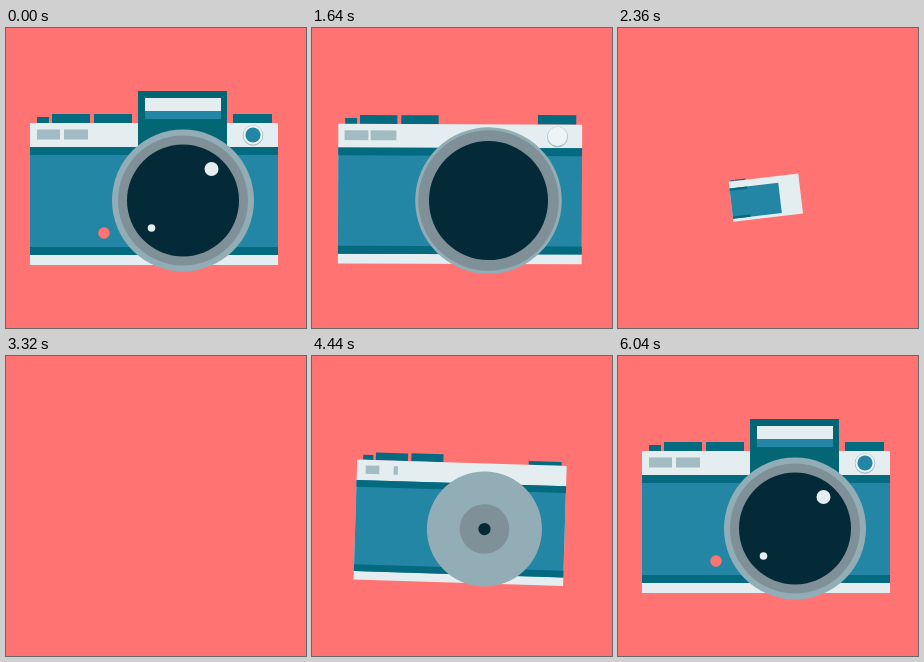
An HTML page with a canvas that plays this animation: 300 by 300 pixels, repeating every 6280 ms.

```html
<!DOCTYPE html>
<html>
<head>
<meta charset="utf-8">
<style>
html, body { margin: 0; height: 100%; overflow: hidden; background: #ff7472; }
canvas { display: block; width: 300px; height: 300px; }
</style>
</head>
<body>
<canvas id="stage" width="300" height="300"></canvas>
<script>
const ctx = document.getElementById('stage').getContext('2d');
const LOOP = 6280, TURN = 3160;
const CORAL = '#ff7472', WHITE = '#e4eef0', BLUE = '#2286a4', DARK = '#036a80',
      SILVER = '#92adb5', GRAY = '#7f9099', GLASS = '#032a36', PALE = '#a3bbc3';

let now = 0; // time on the folding half, played forwards and then backwards

const progress = (start, length) => Math.min(1, Math.max(0, (now - start) / length));
const backIn = u => u * u * (2.70158 * u - 1.70158);
const shrink = (start, length) => Math.max(0, 1 - backIn(progress(start, length)));

function rect(color, x, y, w, h) {
  ctx.fillStyle = color;
  ctx.fillRect(x, y, w, h);
}

function disc(color, x, y, r) {
  if (r <= 0) return;
  ctx.fillStyle = color;
  ctx.beginPath();
  ctx.arc(x, y, r, 0, Math.PI * 2);
  ctx.fill();
}

function wideRect(color, x, y, w, h, scale) {
  rect(color, x + w * (1 - scale) / 2, y, w * scale, h);
}

function knob(x, w, h, start) {
  const tall = h * Math.min(1.1, shrink(start, 400));
  rect(DARK, x, 95 - tall, w, tall);
}

function drawBody() {
  knob(31, 12, 6, 2050);
  knob(46, 38, 9, 2010);
  knob(88, 38, 9, 1800);
  knob(227, 39, 9, 1530);

  rect(WHITE, 24, 95, 248, 142);
  const panel = Math.min(1, shrink(1960, 500));
  const trim = Math.min(1, shrink(1890, 500));
  rect(BLUE, 24, 119, 248 * panel, 108);
  rect(DARK, 24, 119, 248 * trim, 8);
  rect(DARK, 24, 219, 248 * trim, 8);

  wideRect(PALE, 31, 101.5, 23, 10, shrink(1558, 400));
  wideRect(PALE, 58, 101.5, 24, 10, shrink(1498, 400));

  const ring = shrink(1400, 400);
  disc(PALE, 247, 107.5, 10.3 * ring);
  disc('#edf4f5', 247, 107, 9.6 * ring);
  disc(BLUE, 247, 107, 7.6 * shrink(1150, 400));

  disc(GRAY, 98, 205, 5.5 * shrink(1180, 280));
  disc(CORAL, 98, 205, 5.7 * shrink(800, 500));
}

function drawFinder() {
  const fold = progress(1158, 408) ** 2;
  const height = 56 * (1 - fold);
  rect('#036675', 132, 119 - height, 89, height);
  wideRect(BLUE, 139, 83, 76, 8, shrink(520, 500));
  wideRect(WHITE, 139, 70, 76, 13, shrink(580, 500));
}

function drawLens() {
  disc(SILVER, 177, 172.5, 71 * shrink(1531, 524));
  disc(GRAY, 177, 172.5, 65 * shrink(1414, 524));
  disc(GLASS, 177, 172.5, 56 * shrink(1370, 524));
  disc(WHITE, 205.5, 141, 7 * shrink(280, 300));
  disc(WHITE, 145.5, 200, 3.8 * shrink(320, 300));
}

function frame(time) {
  const t = time % LOOP;
  now = t < TURN ? t : 2 * TURN - t;

  rect(CORAL, 0, 0, 300, 300);
  const size = (1 - progress(1500, 1540) ** 2.3) ** 4.15;
  if (size > 0.002) {
    ctx.save();
    ctx.translate(148, 171);
    ctx.rotate(-20 * backIn(progress(1560, 980)) * Math.PI / 180);
    ctx.scale(size, size);
    ctx.translate(-148, -171);
    drawBody();
    drawFinder();
    drawLens();
    ctx.restore();
  }
}

const begin = performance.now();
function tick() {
  frame(performance.now() - begin);
  requestAnimationFrame(tick);
}
tick();
</script>
</body>
</html>
```
